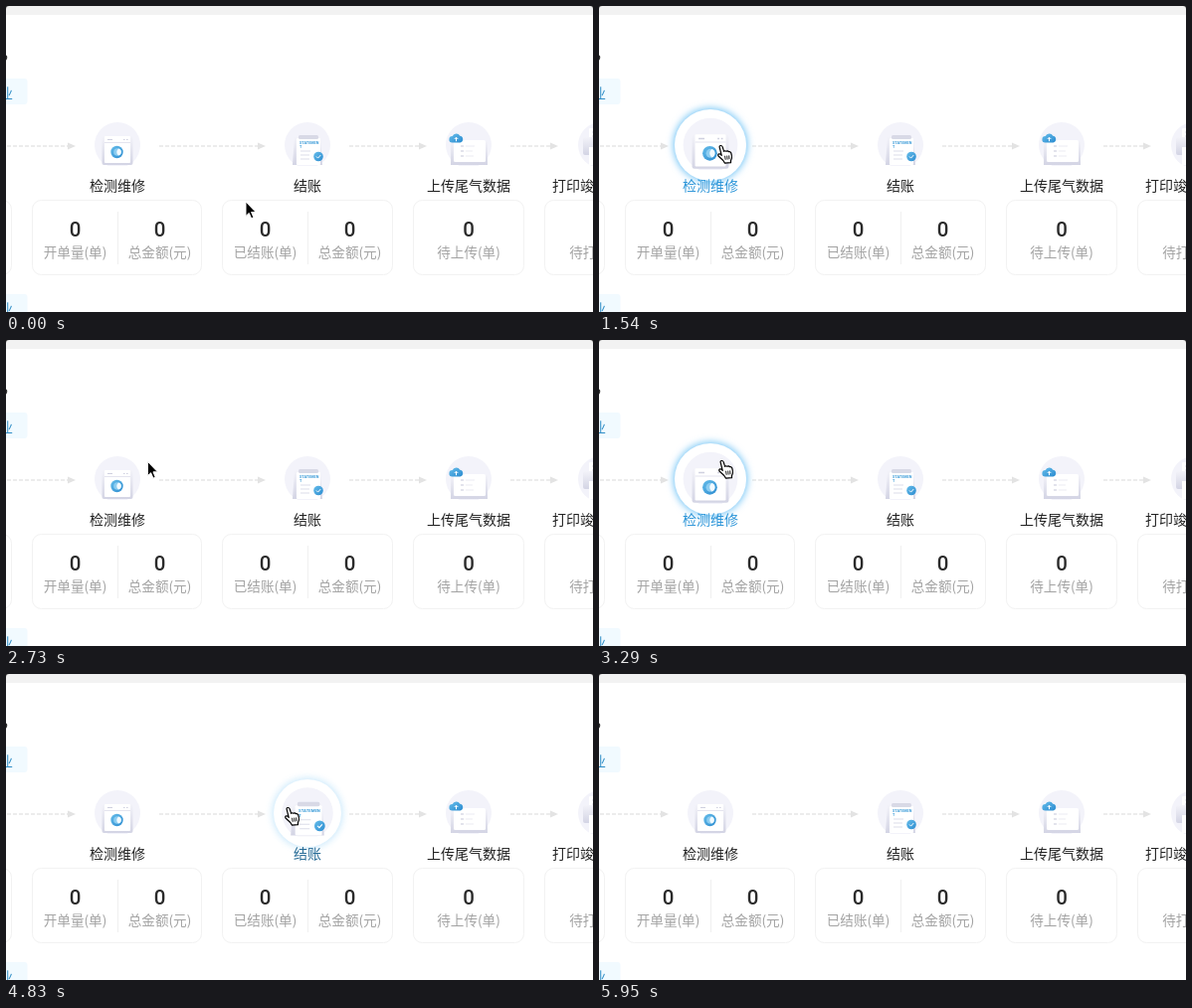
Write an HTML page that moves like this. It is 590x308 px and loops after 6.44 s.

```html
<!DOCTYPE html>
<html lang="zh-CN">
<head>
<meta charset="utf-8">
<style>
  html, body { margin: 0; width: 100%; height: 100%; overflow: hidden; background: #fff; }
  svg { display: block; }
  text { font: 14px "Noto Sans CJK SC", "Noto Sans CJK", "Noto Sans", sans-serif; fill: #222; }
  .mid { text-anchor: middle; }
  .num { font: 500 20.5px Roboto, sans-serif; fill: #2b2b2b; }
  .cap { font-size: 13.6px; fill: #a3a3a3; }
  .tag { fill: #3490c8; }
  .tiny { font: bold 3.8px Roboto, sans-serif; fill: #3d9cd8; }
  .card { fill: #fff; stroke: #f2f2f2; }
</style>
</head>
<body>
<svg width="590" height="308" viewBox="0 0 590 308">
  <defs>
    <clipPath id="cut"><rect x="-24" y="-24" width="48" height="45"/></clipPath>
    <filter id="soft" x="-40%" y="-40%" width="180%" height="180%"><feGaussianBlur stdDeviation="3.2"/></filter>
    <linearGradient id="shell" x2="0" y2="1">
      <stop stop-color="#f3f3f9"/><stop offset="1" stop-color="#d3d4e4"/>
    </linearGradient>
    <linearGradient id="blue" x2="1" y2="1">
      <stop stop-color="#66bdea"/><stop offset="1" stop-color="#2b8bd0"/>
    </linearGradient>

    <g id="repair">
      <rect x="-15.5" y="-9" width="31" height="29" rx="2" fill="url(#shell)"/>
      <rect x="-13" y="-9" width="26" height="27" rx="1" fill="#fff"/>
      <path d="M-13-2.5H13" stroke="#e4e4ef"/>
      <path d="M-10-5.5h5M6-5.5h1.5M9-5.5h1.5" stroke="#cfd0df" stroke-width="1.2"/>
      <circle cx="-.5" cy="7" r="6.2" fill="url(#blue)"/>
      <circle cx="0" cy="7" r="3.8" fill="#8ccdf1"/>
      <path d="M1 3.4a3.7 3.7 0 0 1 0 7.2q-3.5-3.6 0-7.2" fill="#f2faff"/>
    </g>
    <g id="bill">
      <path d="M-13-8h26l2 28h-30z" fill="url(#shell)"/>
      <rect x="-11" y="-7" width="24" height="27" rx="1" fill="#fff"/>
      <rect x="-9" y="-10" width="20" height="4" rx="1.5" fill="#d8d9e6"/>
      <text class="tiny" x="-8" y="-.8">STATEMEN</text>
      <text class="tiny" x="-8" y="3.2">T</text>
      <path d="M-7 6h10M-7 10h9M-7 14h9" stroke="#dcdde9"/>
      <circle cx="11" cy="11.5" r="4.8" fill="url(#blue)"/>
      <path d="M9 11.5l1.6 1.6 2.6-3" fill="none" stroke="#fff"/>
    </g>
    <g id="upload">
      <path d="M-18-4h37v24h-37z" fill="url(#shell)"/>
      <rect x="-15" y="-5" width="32" height="22" rx="1.5" fill="#fff"/>
      <path d="M-8 1h3M-8 6h3M-8 11h3" stroke="#d9dae6" stroke-width="1.4"/>
      <path d="M-3 1h9M-3 6h7M-3 11h8" stroke="#ebebf2"/>
      <path d="M-16.5-2.5a3.2 3.2 0 0 1 .2-6.4 4.2 4.2 0 0 1 7.6-.3 3.4 3.4 0 0 1 .2 6.7z" fill="url(#blue)"/>
      <path d="M-12.5-3.8v-3.8M-14.3-6l1.8-1.8 1.8 1.8" fill="none" stroke="#fff"/>
    </g>
    <g id="print">
      <rect x="-12" y="-17" width="24" height="16" rx="1" fill="#fff"/>
      <path d="M-9-13H9M-9-9H9" stroke="#d9dae6"/>
      <rect x="-18" y="-8" width="36" height="18" rx="2" fill="url(#shell)"/>
      <rect x="-12" y="2" width="24" height="18" fill="#fff"/>
      <path d="M-8 8H8M-8 13H8" stroke="#d3d4e4"/>
    </g>
  </defs>

  <rect width="590" height="308" fill="#fff"/>
  <rect width="590" height="9" fill="#f2f2f2"/>
  <path d="M0 0h3Q0 0 0 3zM590 0h-3q3 0 3 3z" fill="#333"/>
  <path d="M0 50q1.5 2-.6 4.5" fill="none" stroke="#333" stroke-width="1.3"/>
  <g id="tags"></g>
  <g id="flow"></g>
  <g id="cards"></g>
  <g id="icons"></g>
  <g id="titles"></g>
  <g id="cursor">
    <path id="arrow" d="M0 0v14.4l3.3-3 2.3 5.4 2.3-1-2.3-5.3h4.5z" fill="#000" stroke="#fff" stroke-linejoin="round"/>
    <g id="hand" transform="translate(-5 -1)" fill="#fff" stroke="#000" stroke-linejoin="round" stroke-linecap="round">
      <path stroke-width="1.2" d="M2.2 2.4Q1.8.7 3.2.5T5.2 1.9l1.4 4.5Q7.4 5.2 8.9 6.3q1.4-1 2.4.4 1.7-.6 2.4 1 1 3 .7 5.4l-1 2.6.1 2-6 .4-1.7-2.6L1 11Q.2 9.4 1.6 8.9t2.6 1.5z"/>
      <path stroke-width=".9" d="M7.6 11.2l.5 3.2M9.7 11l.4 3.2M11.7 10.8l.3 3.1"/>
    </g>
  </g>
</svg>
<script>
const LOOP = 6440, STEP = 70, FADE = 350;
const NS = 'http://www.w3.org/2000/svg';
const $ = id => document.getElementById(id);

function add(parent, tag, attrs, text) {
  const el = document.createElementNS(NS, tag);
  for (const k in attrs) el.setAttribute(k, attrs[k]);
  if (text) el.textContent = text;
  parent.append(el);
  return el;
}

for (const y of [73, 290]) {
  add($('tags'), 'rect', { x: -30, y, width: 51.5, height: 26, rx: 3, fill: '#f1faff' });
  add($('tags'), 'text', { x: -7, y: y + 19.5, class: 'tag' }, '业');
}

for (const [a, b] of [[1, 70], [154, 261], [345, 423], [507, 555]]) {
  add($('flow'), 'path', { d: `M${a} 141H${b - 7}`, stroke: '#e6e6e6', 'stroke-width': 1.6, 'stroke-dasharray': '4 2' });
  add($('flow'), 'path', { d: `M${b - 8} 137.5l8 3.5-8 3.5z`, fill: '#e3e3e3' });
}

const card = (x, w) => add($('cards'), 'rect', { x: x + .5, y: 195.5, width: w, height: 75, rx: 9, class: 'card' });
const stat = (x, label) => {
  add($('cards'), 'text', { x, y: 231.5, class: 'mid num' }, '0');
  add($('cards'), 'text', { x, y: 253, class: 'mid cap' }, label);
};

card(-165, 170);
const steps = [
  { x: 112, icon: 'repair', title: '检测维修', left: 26, width: 170, stats: ['开单量(单)', '总金额(元)'], hovers: [[1190, 1950], [2760, 3780]] },
  { x: 303, icon: 'bill', title: '结账', left: 217, width: 171, stats: ['已结账(单)', '总金额(元)'], hovers: [[4700, 5320]] },
  { x: 465, icon: 'upload', title: '上传尾气数据', left: 409, width: 111, stats: ['待上传(单)'], hovers: [] },
  { x: 598, icon: 'print', title: '打印竣工出厂证', left: 541, width: 112, stats: ['待打印(单)'], hovers: [] }
];

for (const s of steps) {
  card(s.left, s.width);
  if (s.stats.length > 1) {
    add($('cards'), 'path', { d: `M${s.x + .5} 207v53`, stroke: '#f0f0f0' });
    s.stats.forEach((label, i) => stat(s.x - 42.5 + i * 85, label));
  } else stat(s.x, s.stats[0]);

  s.group = add($('icons'), 'g', {});
  s.glow = add(s.group, 'circle', { r: 31.5, fill: '#7cc8f6', filter: 'url(#soft)' });
  add(s.group, 'circle', { r: 30.3, fill: '#fff' });
  const art = add(s.group, 'g', { 'clip-path': 'url(#cut)' });
  add(art, 'circle', { r: 23, fill: '#f3f3fa' });
  add(art, 'use', { href: '#' + s.icon });
  s.label = add($('titles'), 'text', { x: s.x, y: 186, class: 'mid' }, s.title);
}

// CSS "ease": cubic-bezier(.25, .1, .25, 1)
function ease(x) {
  if (x <= 0) return 0;
  if (x >= 1) return 1;
  let lo = 0, hi = 1, u;
  for (let i = 0; i < 20; i++) {
    u = (lo + hi) / 2;
    if (.75 * u * (1 - u) + u * u * u < x) lo = u; else hi = u;
  }
  return .3 * u * (1 - u) * (1 - u) + 3 * u * u * (1 - u) + u * u * u;
}

const hoverAt = (t, spans) => spans.reduce((p, [a, b]) =>
  p + ease((t - a) / FADE) - ease((t - b) / FADE), 0);

// time, x, y of the pointer's hot spot
const track = [
  [0, 241, 197], [70, 241, 197], [280, 242, 184], [420, 242, 184], [490, 210, 158],
  [630, 210, 158], [840, 172, 150], [1050, 124, 141], [1610, 124, 141],
  [1820, 142, 130], [1960, 174, 119], [2380, 174, 119], [2800, 136, 123],
  [3080, 125, 122], [3500, 125, 122], [3780, 152, 113], [4060, 186, 104],
  [4200, 188, 104], [4270, 202, 106], [4690, 268, 129], [4830, 285, 135],
  [5180, 285, 135], [5320, 264, 138], [5600, 224, 138], [5740, 225, 185],
  [5880, 227, 270], [5950, 228, 325], [LOOP, 228, 325]
];
const onIcon = [[1050, 1890], [2760, 3740], [4700, 5300]];

function pointerAt(t) {
  const i = track.findIndex(k => k[0] > t);
  const [t0, x0, y0] = track[i - 1], [t1, x1, y1] = track[i];
  const p = (t - t0) / (t1 - t0);
  return [x0 + (x1 - x0) * p, y0 + (y1 - y0) * p];
}

const mix = (a, b, p) => a.map((v, i) => Math.round(v + (b[i] - v) * p));

function draw(t) {
  for (const s of steps) {
    const p = hoverAt(t, s.hovers);
    s.group.setAttribute('transform', `translate(${s.x} 140) scale(${1 + .19 * p})`);
    s.glow.setAttribute('opacity', p * p);
    s.label.style.fill = `rgb(${mix([34, 34, 34], [42, 148, 216], p)})`;
  }
  const [x, y] = pointerAt(t);
  const hand = onIcon.some(([a, b]) => t >= a && t < b);
  $('cursor').setAttribute('transform', `translate(${x} ${y})`);
  $('hand').style.display = hand ? '' : 'none';
  $('arrow').style.display = hand ? 'none' : '';
}

const start = performance.now();
function tick() {
  const t = (performance.now() - start) % LOOP;
  draw(Math.floor(t / STEP) * STEP);
  requestAnimationFrame(tick);
}
tick();
</script>
</body>
</html>
```
